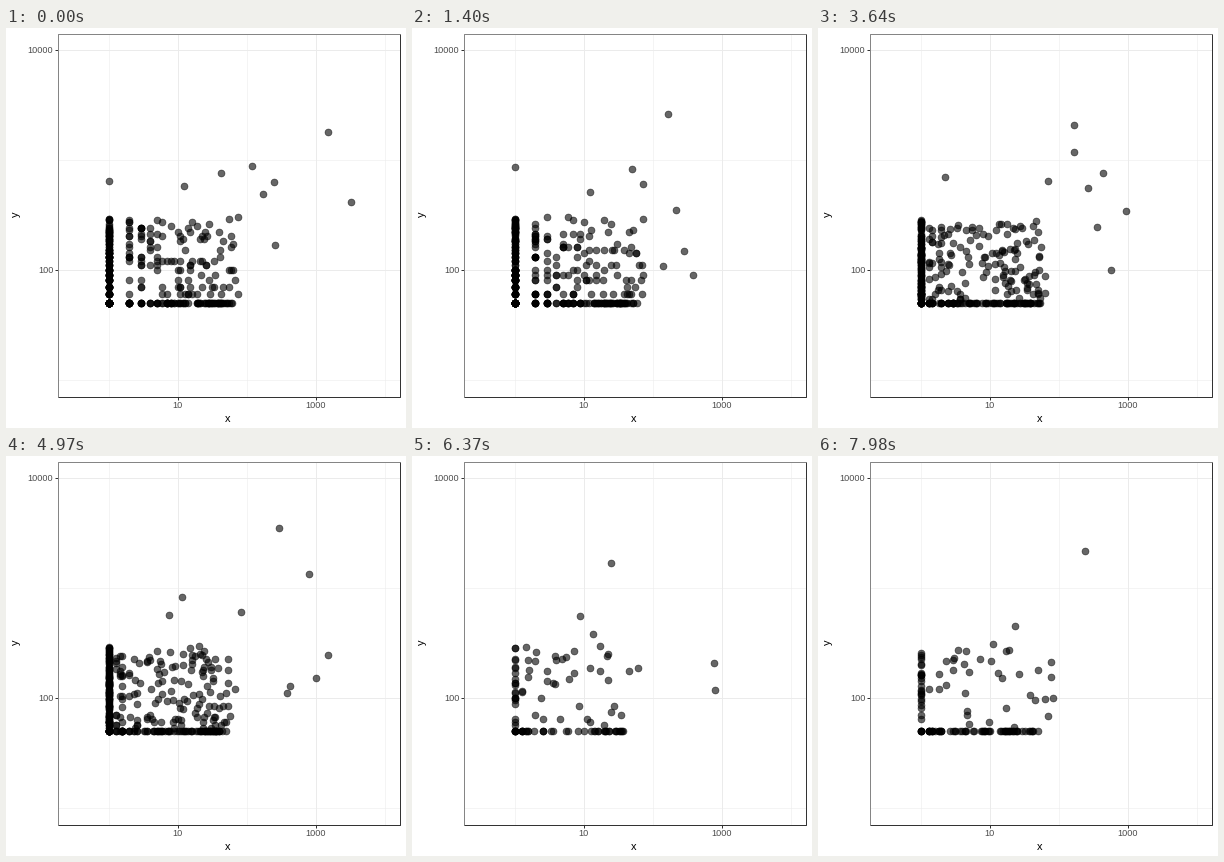
These frames come from a looping animation (400x400 px, 8000 ms). A matplotlib script:

```python
import numpy as np
import matplotlib.pyplot as plt
from matplotlib.animation import FuncAnimation

PX = 0.72            # points per pixel at 100 dpi
TICK, STEP = 20, 70  # ms per drawn frame, ms per motion step
LOOP = 8000
HOLD, MOVE = 6, 14   # steps at rest, steps in motion
REST = [MOVE * i for i in range(7)]

# Key positions of the nine leading points, in stage pixels.
LEAD_AT = [0, 14, 27, 34, 47, 61, 78]
LEAD = np.array([
    [(322, 104), (345, 174), (246, 138), (268, 154), (257, 166),
     (215, 145), (269, 217), (178, 158), (103, 153)],
    [(256, 86), (281, 247), (231, 156), (264, 182), (272, 223),
     (220, 141), (251, 238), (178, 164), (103, 139)],
    [(268, 106), (291, 197), (282, 142), (255, 258), (252, 166),
     (206, 138), (216, 149), (135, 131), (108, 167)],
    [(256, 97), (308, 183), (285, 145), (293, 242), (256, 124),
     (270, 160), (279, 199), (230, 153), (127, 149)],
    [(273, 72), (322, 199), (303, 118), (310, 222), (284, 230),
     (235, 156), (281, 237), (176, 141), (163, 159)],
    [(199, 107), (303, 234), (302, 207), (217, 215), (188, 190),
     (181, 178), (196, 198), (168, 160), (124, 196)],
    [(267, 95), (235, 242), (233, 206), (233, 221), (227, 243),
     (197, 170), (201, 218), (175, 188), (136, 202)]], float)

rng = np.random.default_rng(12)


def to_px(x, y):
    return np.stack([103 + 69 * np.log10(x), 242 - 110 * np.log10(y / 100)], 1)


def wander(n):
    """Ranks in 0..1 for each rest state, drifting a little between states."""
    base = rng.random(n)
    drifted = base + rng.normal(0, 0.14, (len(REST), n))
    return 1 - np.abs(1 - np.abs(drifted))


def whole_x(r, reach, bend):
    return np.floor(10 ** (reach * r ** bend))


def round_y(r, reach, bend):
    return 10 * np.round(5 * 10 ** (reach * r ** bend))


def floor_points(r, q):
    return to_px(whole_x(r, 1.75, 1.2), np.full(r.size, 50.0))


def wall_points(r, q):
    return to_px(np.ones(r.size), round_y(q, 0.77, 1))


def cloud_points(r, q):
    return to_px(whole_x(r, 1.9, 1.7), round_y(q, 0.78, 1.2))


def group(make, n):
    return np.array([make(r, q) for r, q in zip(wander(n), wander(n))])


GROUPS = [group(floor_points, 100), group(wall_points, 70),
          group(cloud_points, 190)]


def blend(knots, rows, u):
    i = max(np.searchsorted(knots, u) - 1, 0)
    w = (u - knots[i]) / (knots[i + 1] - knots[i])
    return rows[i] + (rows[i + 1] - rows[i]) * w


def progress(ms):
    cycle, r = divmod(ms // STEP, HOLD + MOVE)
    return MOVE * cycle + max(0, r - HOLD)


def counts(u):
    if u <= REST[4]:
        return 100, 70, 190
    return (45, 5, 50) if u <= REST[5] else (64, 10, 45)


def positions(u):
    parts = [blend(REST, rows, u)[:n] for rows, n in zip(GROUPS, counts(u))]
    return np.concatenate(parts + [blend(LEAD_AT, LEAD, u)])


fig = plt.figure(figsize=(4, 4), dpi=100, facecolor="white")
ax = fig.add_axes([0, 0, 1, 1])
ax.set_xlim(0.5, 400.5)
ax.set_ylim(400.5, 0.5)
ax.axis("off")

LEFT, RIGHT, TOP, BOTTOM = 52, 394, 6, 369
GRID, DARK, SOFT, TEXT = "#ebebeb", "#333333", "#858585", "#4d4d4d"


def line(xs, ys, color, width=1):
    ax.plot(xs, ys, color=color, lw=width * PX, solid_capstyle="butt", zorder=1)


def label(x, y, text, size, color, ha="center", va="baseline", **kw):
    ax.text(x, y, text, fontsize=size * PX, color=color, ha=ha, va=va,
            family="Liberation Sans", **kw)


for x in (103, 241, 379):
    line([x, x], [TOP, BOTTOM], GRID, 0.5)
for y in (132, 352):
    line([LEFT, RIGHT], [y, y], GRID, 0.5)
for x, text in ((172, "10"), (310, "1000")):
    line([x, x], [TOP, BOTTOM], GRID)
    line([x, x], [BOTTOM, BOTTOM + 3], DARK)
    label(x, 381, text, 9.2, TEXT)
for y, text in ((22, "10000"), (242, "100")):
    line([LEFT, RIGHT], [y, y], GRID)
    line([LEFT - 3, LEFT], [y, y], DARK)
    label(47.8, y + 3.5, text, 9.2, TEXT, ha="right")
line([LEFT, LEFT, RIGHT], [BOTTOM, TOP, TOP], SOFT)
line([LEFT, RIGHT, RIGHT], [BOTTOM, BOTTOM, TOP], DARK)
label(222.5, 395, "x", 11, "black")
label(10.5, 187, "y", 11, "black", va="center", rotation=90)

dots, = ax.plot([], [], "o", color="black", alpha=0.6, ms=6.9 * PX,
                mew=0.7 * PX, zorder=3)


def draw(i):
    p = positions(progress(i * TICK + TICK // 2))
    dots.set_data(p[:, 0], p[:, 1])
    return dots,


anim = FuncAnimation(fig, draw, frames=LOOP // TICK, interval=TICK,
                     init_func=lambda: draw(0), repeat=True, repeat_delay=0,
                     cache_frame_data=False)
plt.show()
```
